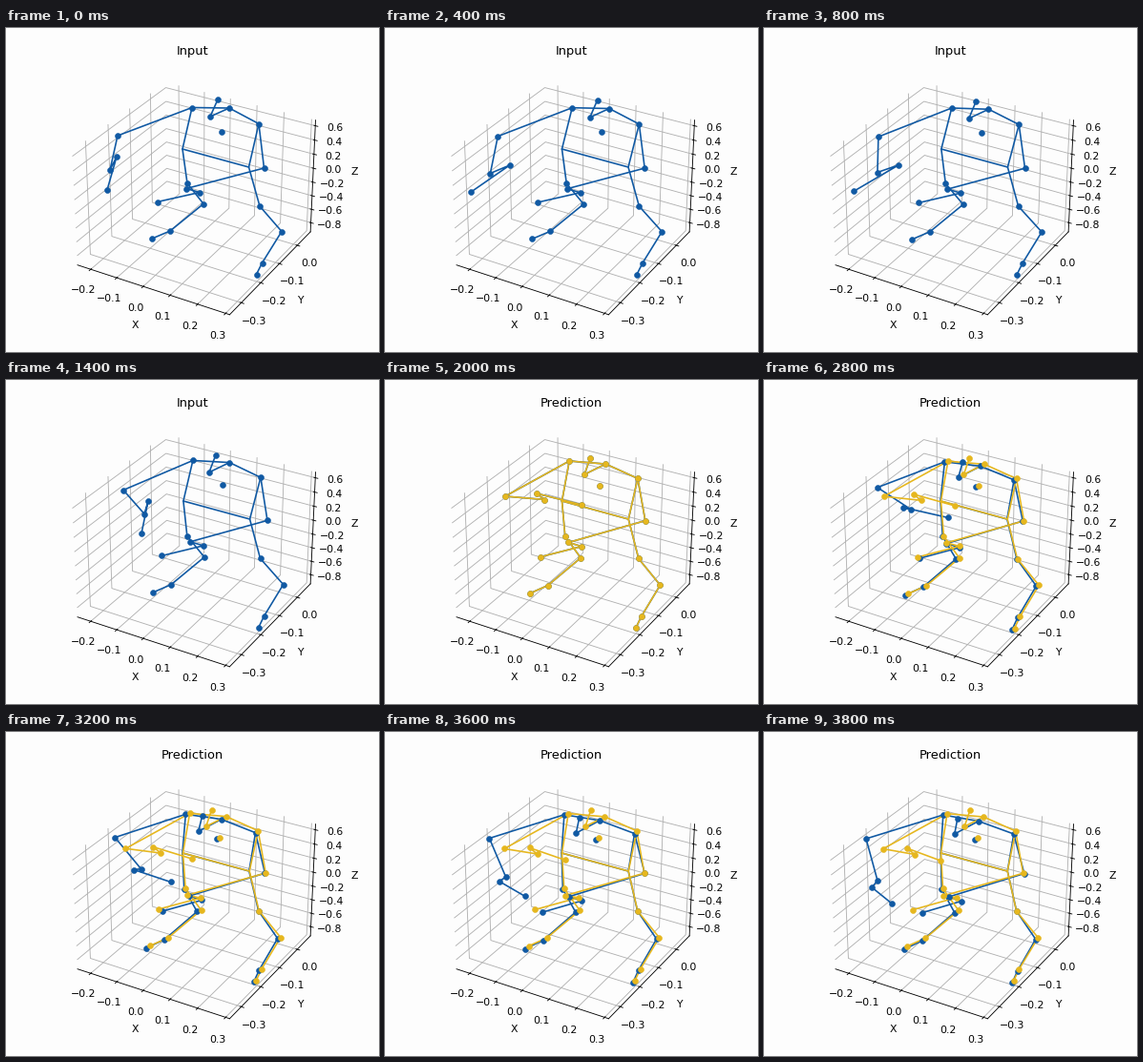
A matplotlib script that plays this animation: 391x340 px, repeating every 4 s.

```python
import numpy as np
import matplotlib.pyplot as plt
from matplotlib.animation import FuncAnimation

W, H = 391, 340
DPI = W / 5
FRAMES, STEP, SWITCH = 20, 200, 10
BLUE, GOLD, PAPER = "#1059a3", "#e6b71e", "#fdfdfd"

# Start position of each joint, then its total lean by the end of the loop
LIMBS = dict(
    crown=(222, 75, -15, 16), face=(214, 93, -10, 14), neck=(234, 84, -5, 9.5),
    chest=(226, 109, -1, 4), shoulder1=(195, 83.5, -3, 3.5), shoulder2=(265, 100.5, 1, 6.5),
    elbow2=(270.5, 147, 6.5, 1.5), wrist2=(189, 168.5, 9, 4.5),
    palm2=(203, 172.5, 8, 5), hand2=(158.5, 182.5, 12, 7),
    ankle1=(207, 184.5, -3, 5), heel1=(172, 213, -2, 6), toe1=(153, 221, -2, 7),
    ankle2=(289, 213.5, 0, 4), heel2=(268.5, 246.5, 1.5, 4), toe2=(262.5, 258.5, 2, 4.5),
)
CORE = dict(
    hip1=(185, 127, 1.5, 0), hip2=(254.5, 146, 2, 0),
    knee1=(190, 163, -2.5, 2), knee2=(266, 187, 0, 1),
)
# The waving arm: one row per key time, one point per joint
ARM_JOINTS = "elbow1", "wrist1", "palm1", "hand1"
ARM_T = np.array([0, 3, 7, 10, 15, 19])
ARM = np.array([
    [(117, 113), (109, 149), (116, 135), (106, 170)],
    [(119, 114), (113, 153), (137, 146), (88, 172)],
    [(123, 115.5), (145, 140.5), (149, 127), (142, 161)],
    [(126, 122), (167, 125.5), (159, 119), (206, 131)],
    [(116.5, 111), (148, 140), (140, 139), (183, 151)],
    [(107, 112), (119, 156), (113, 163), (134, 180)],
], float)
ARM_SPEED = np.gradient(ARM, ARM_T, axis=0)

# How far predicted joints wander from the last input pose
DRIFT = dict(wrist1=(-9, 3), palm1=(-9, 3), hand1=(-21, 4),
             wrist2=(-4.5, 1.5), palm2=(-4, -1), hand2=(-7, 1),
             crown=(1, 0), face=(1, 0), neck=(-1, 1), hip1=(0, 0), hip2=(0, 0))
SMALL = (-1.2, .6)

CHAINS = [c.split() for c in (
    "crown face neck",
    "hand1 palm1 wrist1 elbow1 shoulder1 neck shoulder2 elbow2 wrist2 palm2 hand2",
    "shoulder1 hip1 knee1 ankle1 heel1 toe1",
    "shoulder2 hip2 knee2 ankle2 heel2 toe2",
    "hip1 hip2",
)]


def wave(t):
    """Arm points on a cubic Hermite curve through the key poses."""
    i = min(np.searchsorted(ARM_T, t, side="right"), len(ARM_T) - 1) - 1
    h = ARM_T[i + 1] - ARM_T[i]
    u = (t - ARM_T[i]) / h
    ease = u * u * (3 - 2 * u)
    return (ARM[i] * (1 - ease) + ARM[i + 1] * ease
            + h * u * (1 - u) * ((1 - u) * ARM_SPEED[i] - u * ARM_SPEED[i + 1]))


def pose(t):
    u = t / (FRAMES - 1)
    sway = 2.3 * np.sin(2 * np.pi * t / FRAMES) - 3.5 * u ** 3
    joints = dict(zip(ARM_JOINTS, wave(t)))
    for group, weight in ((LIMBS, 1), (CORE, .3)):
        for name, (x, y, dx, dy) in group.items():
            joints[name] = np.array([x + weight * sway + dx * u ** 1.3, y + dy * u ** 1.3])
    return joints


def predicted(t):
    u = ((t - SWITCH) / (FRAMES - 1 - SWITCH)) ** 1.6
    return {name: p + u * np.array(DRIFT.get(name, SMALL))
            for name, p in pose(SWITCH).items()}


fig = plt.figure(figsize=(W / DPI, H / DPI), dpi=DPI, facecolor=PAPER)

side = 283.8
box = fig.add_axes([53.6 / W, 21.3 / H, side / W, side / H], projection="3d")
box.set_facecolor("none")
box.set(xlim=(-.2513, .3142), ylim=(-.3577, .0765), zlim=(-.937, .678),
        xlabel="X", ylabel="Y", zlabel="Z")
box.set_xticks(np.arange(-2, 4) / 10)
box.set_yticks(np.arange(-3, 1) / 10)
box.set_zticks(np.arange(-4, 4) / 5)
for axis in (box.xaxis, box.yaxis, box.zaxis):
    axis.set_pane_color((1, 1, 1, 0))
title = box.set_title("Input")

stage = fig.add_axes([0, 0, 1, 1])
stage.set(xlim=(0, W), ylim=(H, 0))
stage.axis("off")


def skeleton(color, z):
    bones = [stage.plot([], [], color=color, lw=1.5, zorder=z)[0] for _ in CHAINS]
    dots, = stage.plot([], [], "o", color=color, ms=5.5, mew=.5, zorder=z + 2)
    return bones, dots


def place(body, joints):
    bones, dots = body
    for line, chain in zip(bones, CHAINS):
        line.set_data(*np.array([joints[n] for n in chain]).T)
    dots.set_data(*np.array([p for n, p in joints.items() if n[:3] != "hip"]).T)


actual, guess = skeleton(BLUE, 2), skeleton(GOLD, 3)


def update(frame):
    late = frame >= SWITCH
    title.set_text("Prediction" if late else "Input")
    place(actual, pose(frame))
    if late:
        place(guess, predicted(frame))
    for artist in (*guess[0], guess[1]):
        artist.set_visible(late)


anim = FuncAnimation(fig, update, frames=FRAMES, interval=STEP, repeat=True)
plt.show()
```
